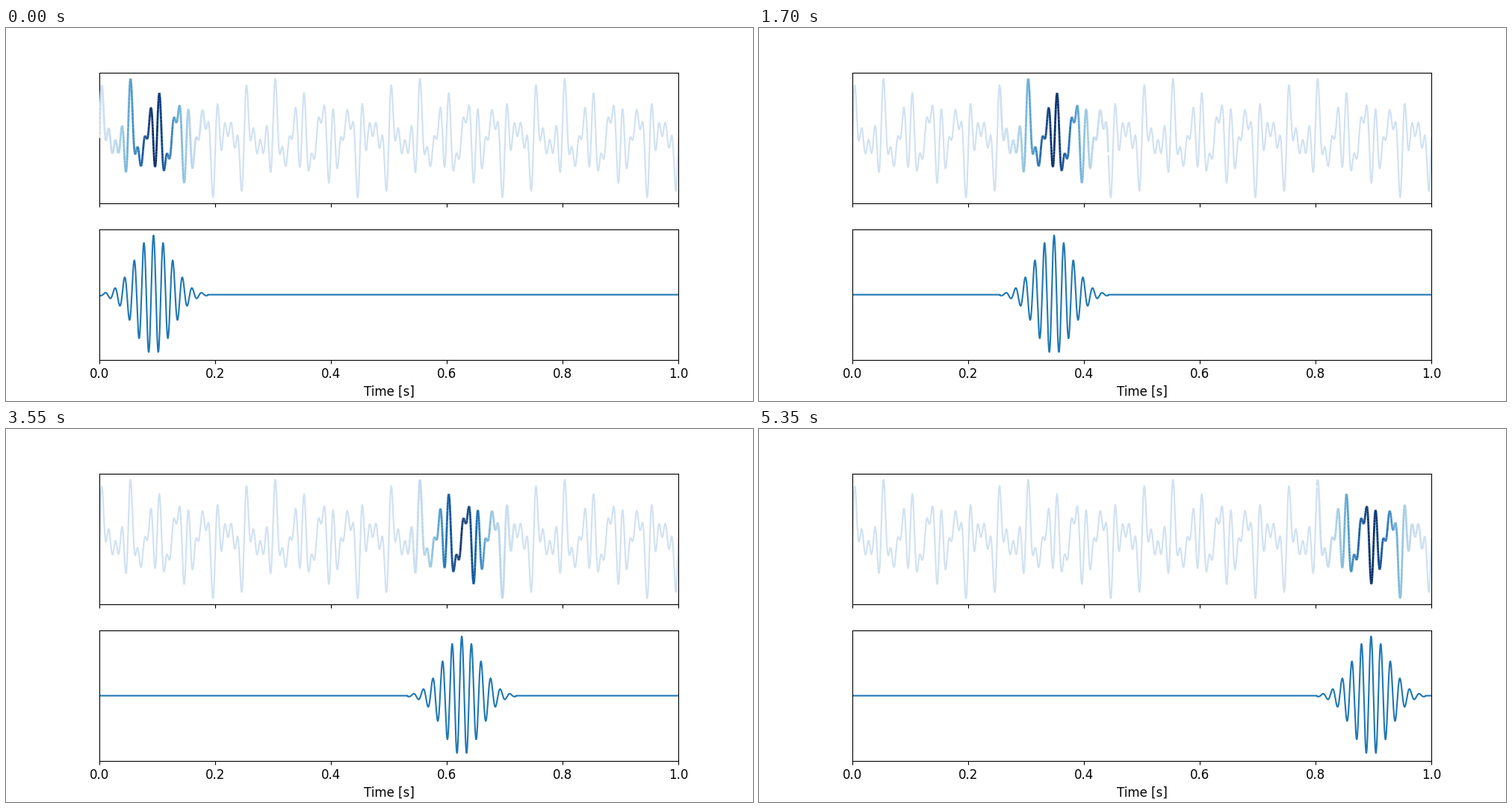
These frames come from a looping animation (1000x500 px, 5.4 s). A matplotlib script:

```python
import numpy as np
import matplotlib.pyplot as plt
from matplotlib.animation import FuncAnimation
from matplotlib.collections import LineCollection

RATE = 4000          # samples per second
FRAMES = 108
HOP = 30             # samples the wavelet moves per frame
FREQ, CYCLES = 60, 12
HALF = 374           # samples on each side of the wavelet's centre

plt.rcParams.update({"font.family": "DejaVu Sans", "font.size": 12})

t = np.arange(RATE + 1) / RATE
signal = sum(np.sin(2 * np.pi * f * t) for f in (24, 40, 60, 80))

tau = np.arange(-HALF, HALF + 1) / RATE
sigma = CYCLES / (2 * np.pi * FREQ)
envelope = np.exp(-tau**2 / (2 * sigma**2))
wavelet = envelope * np.cos(2 * np.pi * FREQ * tau)
size = len(tau)

blues = plt.get_cmap("Blues")
points = np.column_stack([t, signal])
segments = np.stack([points[:-1], points[1:]], axis=1)

fig, (top, low) = plt.subplots(2, 1, sharex=True, figsize=(10, 5), dpi=100)
before, = top.plot([], [], color=blues(0.2), lw=1.5)
after, = top.plot([], [], color=blues(0.2), lw=1.5)
glow = LineCollection([], colors=blues(0.2 + 0.8 * envelope[:-1]),
                      linewidths=2, zorder=3)
top.add_collection(glow, autolim=False)
pulse, = low.plot([], [], color="C0", lw=1.5)

peak = 1.1 * np.abs(signal).max()
top.set(xlim=(0, 1), ylim=(-peak, peak), yticks=[])
low.set(ylim=(-1.1, 1.1), yticks=[], xlabel="Time [s]")


def draw(i):
    start = i * HOP
    end = start + size
    before.set_data(t[:start], signal[:start])
    after.set_data(t[end:], signal[end:])
    glow.set_segments(segments[start:end - 1])
    y = np.zeros_like(t)
    y[start:end] = wavelet
    pulse.set_data(t, y)
    return before, after, glow, pulse


anim = FuncAnimation(fig, draw, frames=FRAMES, interval=50,
                     repeat=True, repeat_delay=0)
plt.show()
```
